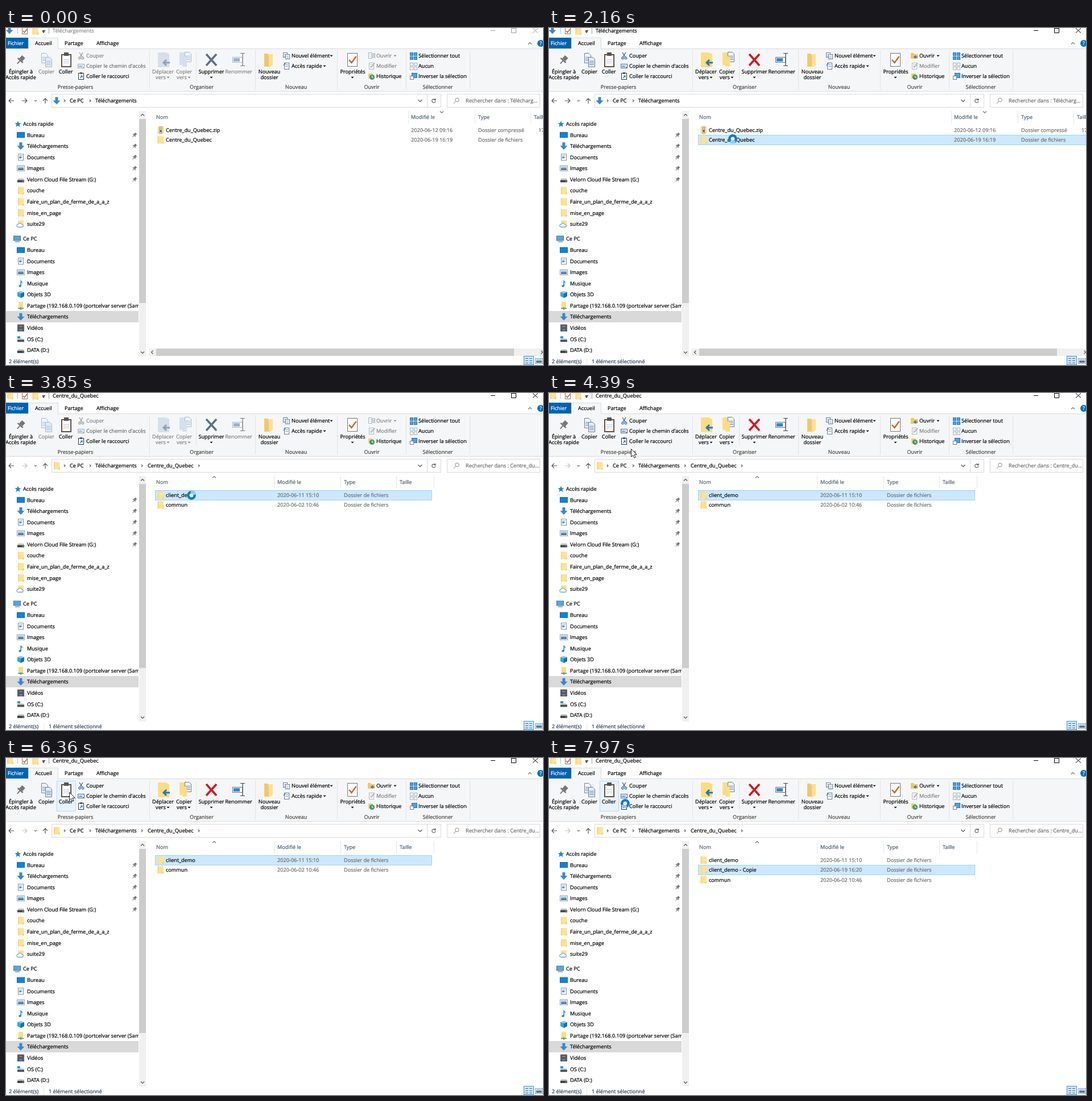
Animation of 944x593 px, one loop 8 s. Source, as an HTML page:

```html
<!DOCTYPE html>
<html lang="fr">
<head>
<meta charset="utf-8">
<title>Explorateur de fichiers</title>
<style>
html, body { margin: 0; width: 100%; height: 100%; overflow: hidden; background: #fff; }
svg { display: block; width: 944px; height: 593px; }
text { font: 9.15px "Open Sans", "Noto Sans", sans-serif; text-rendering: geometricPrecision; white-space: pre; stroke-width: .22px; }
</style>
</head>
<body>
<svg viewBox="0 0 944 593">
  <defs><clipPath id="side"><rect y="140" width="233" height="435"/></clipPath></defs>
  <g id="base"></g><g id="live"></g><g id="pointer"></g>
</svg>
<script>
const LOOP = 8000;
const INK = '#000', GREY = '#6d6d6d', DIM = '#838383', BLUE = '#2f86d6', STEEL = '#5b7391';

// Drawing helpers; text is placed by its vertical centre.
const text = (x, y, s, fill = INK, anchor = 'start') =>
  `<text x="${x}" y="${y + 3.3}" fill="${fill}" stroke="${fill}" text-anchor="${anchor}">${s}</text>`;
const mid = (x, y, s, fill) => text(x, y, s, fill, 'middle');
const rect = (x, y, w, h, fill, stroke) => stroke
  ? `<rect x="${x + .5}" y="${y + .5}" width="${w - 1}" height="${h - 1}" fill="${fill}" stroke="${stroke}"/>`
  : `<rect x="${x}" y="${y}" width="${w}" height="${h}" fill="${fill}"/>`;
const line = (d, stroke = INK, w = 1) => `<path d="${d}" fill="none" stroke="${stroke}" stroke-width="${w}"/>`;
const fill = (d, color) => `<path d="${d}" fill="${color}"/>`;
const dot = (x, y, r, color) => `<circle cx="${x}" cy="${y}" r="${r}" fill="${color}"/>`;
const at = (x, y, s) => `<g transform="translate(${x} ${y})">${s}</g>`;
const vline = (x, y1, y2, color = '#e2e3e4') => rect(x, y1, 1, y2 - y1, color);
const caret = (x, y, color = INK) => fill(`M${x - 2.5} ${y - 1.2}h5l-2.5 2.7z`, color);
const chevron = (x, y, dir, color = '#555', s = 3) => line({
  right: `M${x - s / 2} ${y - s}l${s} ${s}l${-s} ${s}`,
  left: `M${x + s / 2} ${y - s}l${-s} ${s}l${s} ${s}`,
  down: `M${x - s} ${y - s / 2}l${s} ${s}l${s} ${-s}`,
  up: `M${x - s} ${y + s / 2}l${s} ${-s}l${s} ${s}`
}[dir], color, 1.2);

const page = (x, y, w, h, color = '#5f7fa3') => rect(x, y, w, h, '#fff', color) +
  line(`M${x + 2} ${y + 3.5}h${w - 4}M${x + 2} ${y + 6.5}h${w - 4}`, color, .8);

// Small icons, centred on the origin.
const icon = {
  folder: rect(-5, -6.5, 10.5, 13, '#ffe294') + rect(-5, -6.5, 2, 13, '#fad878') +
    fill('M2.5 6.5h3v-4z', '#f0c868'),
  zip: rect(-5, -6.5, 10.5, 13, '#fadb80') + rect(-1.5, -6.5, 4, 13, '#8d8d91') +
    line('M.5 -6v12', '#eee', 1.6) + rect(-1, 0, 3, 3, '#4d5f73'),
  star: fill('M0 -5.5l1.6 3.8l4 .2l-3.1 2.6l1.1 4l-3.6 -2.2l-3.6 2.2l1.1 -4l-3.1 -2.6l4 -.2z', '#1f87d8'),
  desk: rect(-7, -5, 14, 10, '#0a84e3', '#0665b5'),
  down: fill('M-2.5 -6.5h5v6h4l-6.5 7l-6.5 -7h4z', '#3787d2'),
  doc: page(-5, -6, 10, 12, '#7b8ea3') + rect(-3, -1, 4, 3, '#4a91d0'),
  image: rect(-7, -5, 14, 10, '#fff', '#8d9aa5') + rect(-5, -3, 10, 4, '#8cc6ee') + rect(-5, 0, 10, 3, '#49708c'),
  drive: fill('M-4.5 -2h9l1.5 3h-12z', '#ccc') + rect(-6, 1, 12, 4, '#3f4347') + rect(3, 2.5, 2, 1, '#9f9'),
  cloud: rect(-5, -6.5, 10, 13, '#ffe294') + `<path d="M-5 5.5a2.5 2.5 0 0 1 .5 -5a3.2 3.2 0 0 1 6 0a2.5 2.5 0 0 1 .5 5z" fill="#fff" stroke="#3c8bd0"/>`,
  pc: rect(-7, -5.5, 13, 9, '#4fa9e8', '#4e7698') + rect(-4, 4.5, 8, 1.5, '#7e95a8'),
  music: fill('M-.5 -6.5c1 3 4.5 3 3.7 7c-.4 -2 -1.6 -2.6 -2.2 -2.7v6c0 3.5 -5 3 -4.6 .7c.2 -1.8 2 -2 3.1 -1.6z', '#1684d8'),
  cube: fill('M-6 -4l6 -2l6 2v7l-6 3l-6 -3z', '#33a5d9') + fill('M0 -2l6 -2v7l-6 3z', '#1671ae') + fill('M-6 -4l6 -2l6 2l-6 2z', '#80d0ef'),
  share: rect(-4, -6.5, 8, 10, '#ffdc7c') + rect(-5, 4, 10, 1.5, '#3d8a5f') + rect(-1.5, 3, 3, 4, '#57a777'),
  video: rect(-6, -6, 12, 12, '#39414d') + rect(-3, -4.5, 6, 4, '#8e7069') + rect(-3, 1, 6, 4, '#597fa8') +
    '<path d="M-4.7 -5v10M4.7 -5v10" stroke="#ddd" stroke-dasharray="1.3 1.3"/>',
  system: rect(-6, -5, 5, 4, '#1e96e5') + rect(-6, 1, 12, 4, '#495057') + fill('M-4 -1h8l2 2h-12z', '#c9ced2'),
  pin: '<g transform="rotate(42)">' + rect(-2, -4, 4, 4, '#777') + rect(-3.3, 0, 6.6, 1.4, '#777') + line('M0 1v4', '#777') + '</g>',
  check: rect(-5, -6, 10, 12, '#fff', '#777') + line('M-3 0l2.3 3l4.5 -6', '#d4621f', 1.6)
};
const put = (name, x, y) => at(x, y, icon[name]);

function sidebar() {
  const quick = [['desk', 'Bureau', 1], ['down', 'Téléchargements', 1], ['doc', 'Documents', 1], ['image', 'Images', 1],
    ['drive', 'Velorn Cloud File Stream (G:)', 1], ['folder', 'couche'], ['folder', 'Faire_un_plan_de_ferme_de_a_a_z'],
    ['folder', 'mise_en_page'], ['cloud', 'suite29']];
  const computer = [['desk', 'Bureau'], ['doc', 'Documents'], ['image', 'Images'], ['music', 'Musique'], ['cube', 'Objets 3D'],
    ['share', 'Partage (192.168.0.109 (portcelvar server (Sam'], ['down', 'Téléchargements'], ['video', 'Vidéos'],
    ['system', 'OS (C:)'], ['drive', 'DATA (D:)']];
  const list = (items, top) => items.map(([name, label, pinned], i) => {
    const y = top + i * 19.58;
    return put(name, 26, y) + text(37, y, label) + (pinned ? put('pin', 226, y) : '');
  }).join('');
  return rect(0, 498, 233, 20, '#d9d9d9') +
    put('star', 21, 169) + text(30, 168.5, 'Accès rapide') + put('pc', 20, 371) + text(30, 371, 'Ce PC') +
    `<g clip-path="url(#side)">${list(quick, 188.2)}${list(computer, 390.7)}</g>` +
    rect(234, 146, 12, 432, '#f0f0f0') + rect(234, 160, 12, 324, '#cdcdcd') +
    chevron(240, 153, 'up') + chevron(240, 571, 'down');
}

function base() {
  const groups = [[122, 'Presse-papiers'], [344, 'Organiser'], [510, 'Nouveau'], [643, 'Ouvrir'], [759, 'Sélectionner']];
  return rect(0, 0, 944, 593, '#fff') +
    vline(20, 0, 10, '#bbb') + put('check', 33, 5) + put('folder', 51.5, 5) + caret(66, 7) + line('M64 4.5h5') + vline(75, 0, 10, '#999') +
    rect(0, 37, 944, 75, '#f5f6f7') + rect(0, 36, 944, 1, '#dadbdc') + rect(0, 111, 944, 1, '#dadbdc') +
    rect(39, 17, 53, 21, '#f5f6f7') + line('M39.5 37V17.5H91.5V37', '#dadbdc') +
    rect(0, 17, 39, 19, '#0063b1') + text(3, 27, 'Fichier', '#fff') +
    text(51, 27, 'Accueil') + text(103, 27, 'Partage') + text(159, 27, 'Affichage') +
    chevron(921, 27, 'up', '#777') + dot(940, 27, 6, '#0071c5') + mid(940, 27, '?', '#fff') +
    [253, 439, 583, 704, 816].map(x => vline(x - 1, 39, 108)).join('') + vline(334, 42, 93) +
    groups.map(([x, s]) => mid(x, 104, s, '#444')).join('') +
    `<g transform="translate(26 56) scale(1.85)">${icon.pin}</g>` + mid(26, 77, 'Épingler à') + mid(26, 87, 'Accès rapide') +
    fill('M454 45h6l2 2v21h-8z', '#f3c768') + fill('M460 46h9v19l-7 5v-21z', '#ffdf91') +
    mid(463, 77, 'Nouveau') + mid(463, 87, 'dossier') +
    page(487, 43, 8, 9) + page(491, 46, 8, 9) + text(502, 49, 'Nouvel élément') + caret(572, 49) +
    page(489, 61, 9, 12) + line('M488 66l3 -4', BLUE, 1.5) + text(502, 67, 'Accès rapide') + caret(560, 67) +
    rect(600, 44, 18, 24, '#fff', '#777') + line('M603 56l4.5 5l8 -11', '#d4621f', 2.4) + mid(609.5, 77, 'Propriétés') + caret(609, 87) +
    page(638, 61, 9, 12, '#adb6c0') + line('M641 70l7 -8', '#aaa', 1.5) + text(651, 67, 'Modifier', DIM) +
    at(642, 85, rect(-5, -5, 8, 9, '#f4cf67') + dot(1.5, 1.5, 4.5, '#3c9c62') + line('M1.5 -1v3h2.5', '#fff')) + text(651, 85, 'Historique') +
    [[710, 43], [717, 43], [710, 50], [717, 50]].map(([x, y]) => rect(x, y, 6, 6, '#4ba3e6', '#1778c2') +
      rect(x, y + 18, 6, 6, '#fff', '#a9b3bd')).join('') +
    rect(713, 79, 10, 9, '#4ba3e6', '#1778c2') + rect(710, 84, 7, 7, '#fff', '#779') +
    text(725, 49, 'Sélectionner tout') + text(725, 67, 'Aucun') + text(725, 85, 'Inverser la sélection') +
    line('M14 128H5M9 124l-4 4l4 4', '#555', 1.2) + chevron(52, 128, 'down', '#777', 2) + line('M69 133v-9M65 128l4 -4l4 4', '#555', 1.2) +
    rect(80, 116, 685, 24, '#fff', '#d9d9d9') + vline(740, 116, 140, '#d9d9d9') + chevron(728, 128, 'down', '#555', 3.5) +
    line('M754.3 126.2a3.1 3.1 0 1 0 .7 2.4M755 124v2.7h-2.7', '#555', 1.1) +
    rect(775, 116, 164, 24, '#fff', '#d9d9d9') +
    '<circle cx="793" cy="126.5" r="3.3" fill="none" stroke="#888"/>' + line('M790.5 129l-3.5 4', '#888') +
    chevron(103, 128, 'right', '#555', 2.2) + text(112, 128, 'Ce PC') + chevron(148, 128, 'right', '#555', 2.2) + text(157, 128, 'Téléchargements') +
    sidebar() + text(5, 587, '2 élément(s)', '#2c3e5a') +
    rect(910, 577, 18, 16, '#cce8ff', '#3a96d8') +
    [581, 585, 589].map(y => line(`M913 ${y + .5}h5M920 ${y + .5}h5`, '#567')).join('') + at(937, 586, icon.image);
}

// Ribbon commands that depend on the selection (on) and the clipboard (paste).
function ribbon(on, paste, copyFill, pasteFill) {
  const ink = on ? INK : DIM, blue = on ? STEEL : '#9fb2c8', gold = on ? '#ffdc80' : '#d6dfeb';
  const frame = (x, c) => c ? rect(x, 40, 34, 54, c, '#b9d9f2') : '';
  const sheet = (x, y, c) => fill(`M${x} ${y}h8l4 4v14h-12z`, c) + line(`M${x + .5} ${y + .5}h7.5l3.5 3.5v13.5h-11zM${x + 2} ${y + 7.5}h8M${x + 2} ${y + 10.5}h8M${x + 2} ${y + 13.5}h8`, blue, .9);
  const big = (x, label) => mid(x, 77, label, ink) + mid(x - 4, 87, 'vers', ink) + caret(x + 9, 87, ink);
  return frame(55, copyFill) + frame(89, pasteFill) +
    sheet(62, 44, '#eef5fd') + sheet(69, 51, '#dfecfa') + mid(71, 77, 'Copier', ink) +
    rect(97, 46, 18, 23, '#fff', paste ? '#454545' : '#aaa') + rect(98, 47, 16, 21, '#fff', paste ? '#8b5d3f' : '#bbb') + rect(102, 43, 8, 6, paste ? '#555' : '#aaa') +
    line('M101 55.5h10M101 58.5h10M101 61.5h10', '#b3c8dd') + mid(105, 77, 'Coller', paste ? INK : DIM) +
    line('M129 43l5 8M135 43l-5 8', on ? '#456' : '#999', 1.2) +
    `<g fill="none" stroke="${on ? '#1d78c4' : '#999'}" stroke-width="1.3"><circle cx="129.5" cy="53" r="1.8"/><circle cx="135" cy="53" r="1.8"/></g>` + text(141, 49, 'Couper', ink) +
    rect(126, 63, 12, 8, '#dfebf7', blue) + line('M128 66l1.5 3l1.5 -3l1.5 3l1.5 -3M135 69.5h2', on ? '#1d5d9b' : '#8492a2', .8) + text(141, 67, "Copier le chemin d'accès", on ? INK : GREY) +
    rect(127, 79, 10, 12, '#fff', paste ? '#333' : '#aaa') + rect(130, 78, 4, 3, '#555') + line('M130 88l4 -4M131 84h3v3', '#1778c2', 1.2) + text(141, 85, 'Coller le raccourci', paste ? INK : DIM) +
    fill('M267 43h14l6 3v23h-20z', gold) + line('M288 61h-10M282 56l-5 5l5 5', on ? '#1b78ca' : '#8fa1b8', 3) + big(276, 'Déplacer') +
    fill('M305 43h12v22h-12z', gold) + sheet(314, 42, '#edf4fb') + fill('M310 50h8v18h-8z', gold) + big(313, 'Copier') +
    line('M352 46l18 20M370 46l-18 20', on ? '#d5161e' : '#5b708c', 3.6) + mid(361, 77, 'Supprimer') + caret(361, 87) +
    rect(398, 51, 18, 10, '#fff', blue) + rect(400, 53, 11, 6, on ? '#3388cf' : '#9cb1c9') + line('M412 44.5h3l1 1l1 -1h3M416 45v21M412 66.5h3l1 -1l1 1h3', on ? '#444' : '#777', 1.2) + mid(409, 77, 'Renommer', ink) +
    (on ? fill('M636 44h5l1 2h6v8h-12z', '#f3c657') + line('M648 51h-5M645 48.5l-3 2.5l3 2.5', '#1f7acb', 1.5)
      : page(637, 43, 6, 11, '#a6b1bd') + line('M645 44v9M648 44v9', '#a6b1bd', 1.6)) +
    text(651, 49, 'Ouvrir', ink) + caret(684, 49, ink);
}

const ROW_TOP = 171, ROW_H = 17.1;
function fileList(inside, pasted, selected, hover) {
  const head = '#4c607a', right = inside ? 749 : 946;
  const cols = inside ? [477, 594, 692] : [712, 830, 928];
  const rows = inside
    ? [['folder', 'client_demo', '2020-06-11 15:10'], ...(pasted ? [['folder', 'client_demo - Copie', '2020-06-19 16:20']] : []), ['folder', 'commun', '2020-06-02 10:46']]
    : [['zip', 'Centre_du_Quebec.zip', '2020-06-12 09:16', 'Dossier compressé', '17'], ['folder', 'Centre_du_Quebec', '2020-06-19 16:19']];
  const seps = inside ? [471, 588, 686, 752] : [707, 824, 922];
  return seps.map(x => vline(x, 146, 168, '#e5e5e5')).join('') +
    (inside ? chevron(366, 148, 'up', '#777') : chevron(766, 148, 'down', '#777')) +
    text(264, 156.5, 'Nom', head) + ['Modifié le', 'Type', inside ? 'Taille' : 'Taill'].map((s, i) => text(cols[i], 156.5, s, head)).join('') +
    rows.map(([name, label, date, type = 'Dossier de fichiers', size = ''], i) => {
      const top = Math.round(ROW_TOP + i * ROW_H), y = 180 + i * ROW_H;
      const mark = i === selected ? rect(262, top, right - 262, 18, '#cce8ff', '#9fd3fb')
        : i === hover ? rect(262, top, right - 262, 18, '#e5f3ff') : '';
      return mark + put(name, 271.5, y - .3) + text(281, y, label) + text(cols[0], y, date, GREY) + text(cols[1], y, type, GREY) + text(936, y, size, GREY);
    }).join('') +
    (inside ? '' : rect(251, 564, 693, 13, '#f0f0f0') + rect(264, 564, 629, 13, '#cdcdcd') + chevron(257, 570.5, 'left') + chevron(942, 570.5, 'right'));
}

const path = [[270, 620, 566], [850, 325, 177], [1010, 325, 177], [1160, 323, 194.5], [3150, 323, 194.5], [3370, 326, 180],
  [3950, 326, 180], [4620, 77, 68], [4660, 78, 69], [5870, 78, 69], [6360, 111, 60], [7850, 110, 60], [7970, 134, 80]];
function pointerAt(t) {
  if (t < path[0][0]) return null;
  const i = path.findIndex(k => k[0] > t);
  if (i < 0) return path[path.length - 1].slice(1);
  const [t0, x0, y0] = path[i - 1], [t1, x1, y1] = path[i];
  const p = (t - t0) / (t1 - t0), e = p * p * (3 - 2 * p);
  return [x0 + (x1 - x0) * e, y0 + (y1 - y0) * e];
}

const arrow = '<path d="M.5 .5V14.3L3.7 11.3L6 16.2L8.2 15.2L6 10.4H10.3Z" fill="#fff" stroke="#111" stroke-width=".9"/>';
const spinner = t => '<circle r="5.7" fill="#fff" stroke="#0e7cd6" stroke-width="4.4"/>' +
  `<path d="M4 -4A5.7 5.7 0 0 1 4 4" fill="none" stroke="#8fd0f8" stroke-width="4" transform="rotate(${90 + (t - 2160) * 360 / 960})"/>`;

const within = (t, a, b) => t >= a && t < b;
const layers = Object.fromEntries(['base', 'live', 'pointer'].map(id => [id, document.getElementById(id)]));
let shown = '';

function draw(t) {
  const active = t >= 1320, inside = t >= 2200, pasted = t >= 7520;
  const on = within(t, 1320, 2200) || t >= 3900;
  const selected = !inside ? (active ? 1 : -1) : t < 3550 ? -1 : pasted ? 1 : 0;
  const busy = within(t, 1420, 2740) || within(t, 3600, 3900) || t >= 7380;
  const pos = pointerAt(t), [x, y] = pos || [-99, -99];
  const hover = x > 262 ? Math.floor((y - ROW_TOP) / ROW_H) : -1;
  const over = left => x >= left && x < left + 34 && y >= 40 && y < 94;
  const copyFill = within(t, 5050, 5290) ? '#c9e3f8' : over(55) ? '#e8f2fb' : '';
  const pasteFill = within(t, 6620, 6830) ? '#c9e3f8' : over(89) || t > 7380 ? '#e8f2fb' : '';
  const chrome = active ? INK : '#999';

  const live = put(inside ? 'folder' : 'down', inside ? 7 : 6, 4) + text(82, 5, inside ? 'Centre_du_Quebec' : 'Téléchargements', active ? INK : '#888') +
    line('M852 4.5h8M888.5 .5h8v8h-8zM926 .5l9 8M935 .5l-9 8', chrome) +
    line('M28 128h9M33 124l4 4l-4 4', inside ? '#c4c4c4' : '#555', 1.2) +
    put(inside ? 'folder' : 'down', 89, 128) +
    (inside ? chevron(239, 128, 'right', '#555', 2.2) + text(249, 128, 'Centre_du_Quebec') + chevron(339, 128, 'right', '#555', 2.2) : '') +
    text(808, 128, 'Rechercher dans : ' + (inside ? 'Centre_du...' : 'Télécharg...'), GREY) +
    ribbon(on, !within(t, 5330, 5370), copyFill, pasteFill) +
    fileList(inside, pasted, selected, hover) +
    (selected >= 0 ? vline(66, 581, 593, '#e8e8e8') + text(75, 587, '1 élément sélectionné', '#2c3e5a') : '');
  if (live !== shown) layers.live.innerHTML = shown = live;

  // The busy ring stands still during the two pauses.
  const spin = within(t, 3690, 3900) ? 3690 : within(t, 7640, 7850) ? 7640 : t;
  layers.pointer.innerHTML = pos ? at(Math.round(x), Math.round(y), busy ? spinner(spin) : arrow) : '';
}

layers.base.innerHTML = base();
const start = performance.now();
function tick() {
  draw((performance.now() - start) % LOOP);
  requestAnimationFrame(tick);
}
tick();
</script>
</body>
</html>
```
